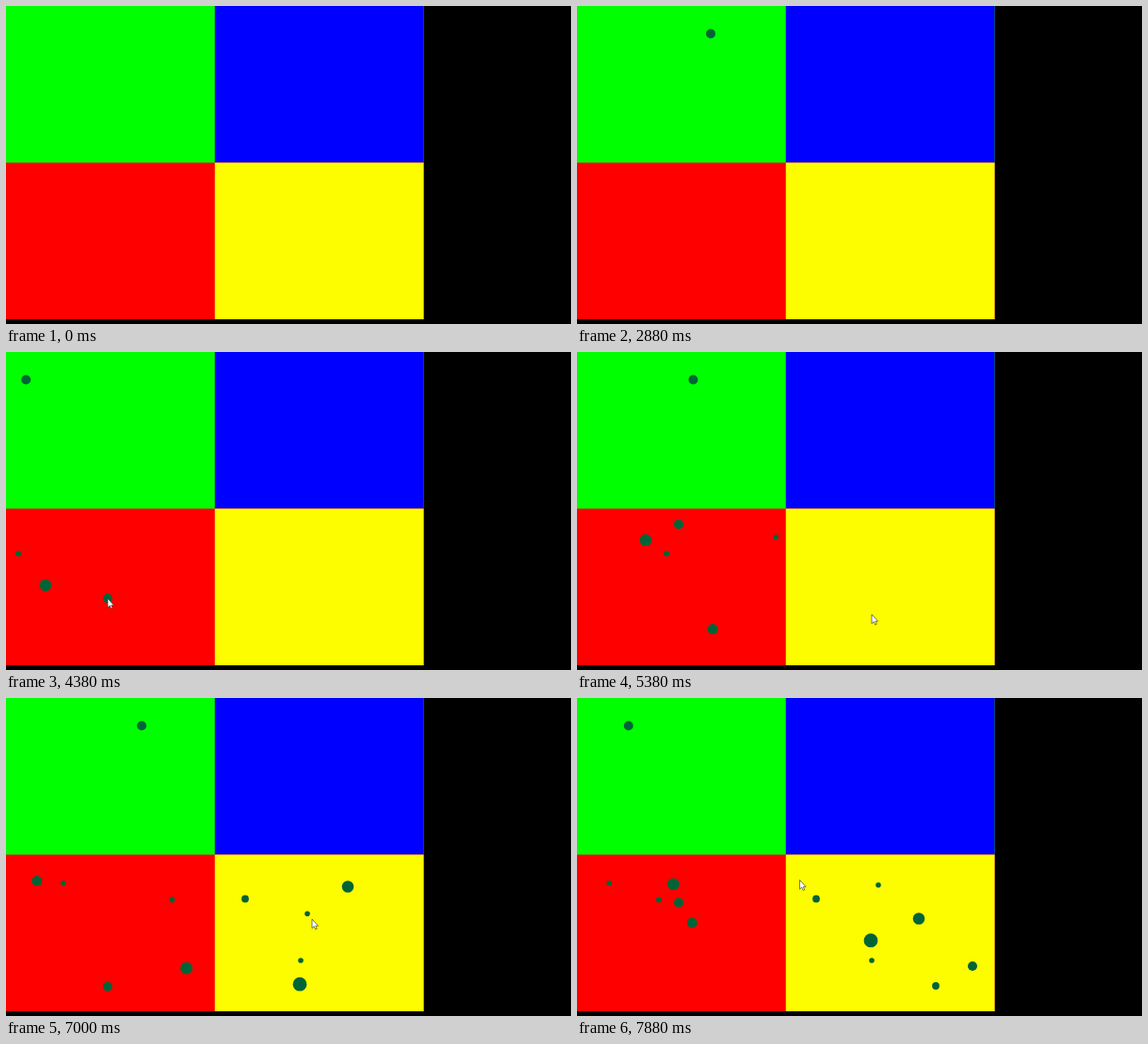
An HTML page with a canvas that plays this animation: 600 by 338 pixels, repeating every 8000 ms.

```html
<!DOCTYPE html>
<html lang="en">
<head>
<meta charset="utf-8">
<title>Bouncing balls</title>
<style>
  html, body { margin: 0; width: 100%; height: 100%; overflow: hidden; background: #000; }
  canvas { display: block; }
</style>
</head>
<body>
<canvas id="stage" width="600" height="338"></canvas>
<script>
const ctx = document.getElementById('stage').getContext('2d');
const LOOP = 8000, STEP = 125;
const SPEED = 12.77;              // pixels per step
const W = 221.75, H = 166.5;      // one cell
const cells = ['#0f0', '#00f', '#f00', '#fdfd00'];

// Pointer stops: step, x, y. A radius makes the stop a click that drops a ball,
// which then travels towards the given compass points, or rests without any.
const stops = [
  [22, 142, 29.5, 5, 'W'],
  [23, 153.5, 214.5, 3, 'W'],
  [31, 80.3, 286.3, 6.4, 'NW'],
  [34, 108, 262, 5, 'N'],
  [37, 147.4, 196.8, 2.7, 'E'],
  [40, 169.7, 269, 5.5, 'SW'],
  [43, 313, 279, 2.8],
  [45, 254, 213.5, 3.9],
  [47, 312, 202, 7.4, 'S'],
  [51, 355, 243.5],
  [53, 363, 226, 6.3, 'N'],
  [54, 320, 242, 2.8, 'N'],
  [56, 325, 235],
  [58, 381, 306, 3.9],
  [60, 420, 285, 5],
  [63, 236.5, 193.5]
].map(([at, x, y, r = 0, way = '']) => ({ at, x, y, r, way }));

const arrow = new Path2D('M0 0V9.7L2.2 7.6L3.7 11L5.2 10.3L3.8 7.2H6.6Z');

// Reflect a straight path between the walls of the cell it starts in
function bounce(from, shift, size, r) {
  const lo = Math.floor(from / size) * size + r;
  const span = size - 2 * r, period = 2 * span;
  const m = ((from + shift - lo) % period + period) % period;
  return lo + Math.min(m, period - m);
}

function drawBall({ at, x, y, r, way }, step) {
  if (!r || step <= at) return;
  const d = (step - at - 1) * SPEED;
  const go = (plus, minus) => d * (way.includes(plus) - way.includes(minus));
  ctx.beginPath();
  ctx.arc(bounce(x, go('E', 'W'), W, r), bounce(y, go('S', 'N'), H, r), r, 0, 2 * Math.PI);
  ctx.fill();
}

// The pointer rests at a stop, then reaches the next in at most two steps
function drawPointer(step) {
  const i = stops.findIndex(s => s.at >= step);
  if (i < 2) return;
  const a = stops[i - 1], b = stops[i];
  const travel = Math.max(1, Math.min(2, b.at - a.at - 1));
  const k = Math.max(0, 1 - (b.at - step) / travel);
  ctx.save();
  ctx.translate(a.x + (b.x - a.x) * k, a.y + (b.y - a.y) * k);
  ctx.fillStyle = '#fff';
  ctx.strokeStyle = '#222';
  ctx.lineWidth = 0.6;
  ctx.fill(arrow);
  ctx.stroke(arrow);
  ctx.restore();
}

function draw(step) {
  ctx.fillStyle = '#000';
  ctx.fillRect(0, 0, 600, 338);
  // Each cell runs to the far corner so that no dark seam shows
  cells.forEach((color, i) => {
    const x = i % 2 * W, y = (i >> 1) * H;
    ctx.fillStyle = color;
    ctx.fillRect(x, y, 2 * W - x, 2 * H - y);
  });
  ctx.fillStyle = '#006437';
  stops.forEach(s => drawBall(s, step));
  drawPointer(step);
}

const start = performance.now();
function tick() {
  draw(Math.floor((performance.now() - start) % LOOP / STEP));
  requestAnimationFrame(tick);
}
tick();
</script>
</body>
</html>
```
